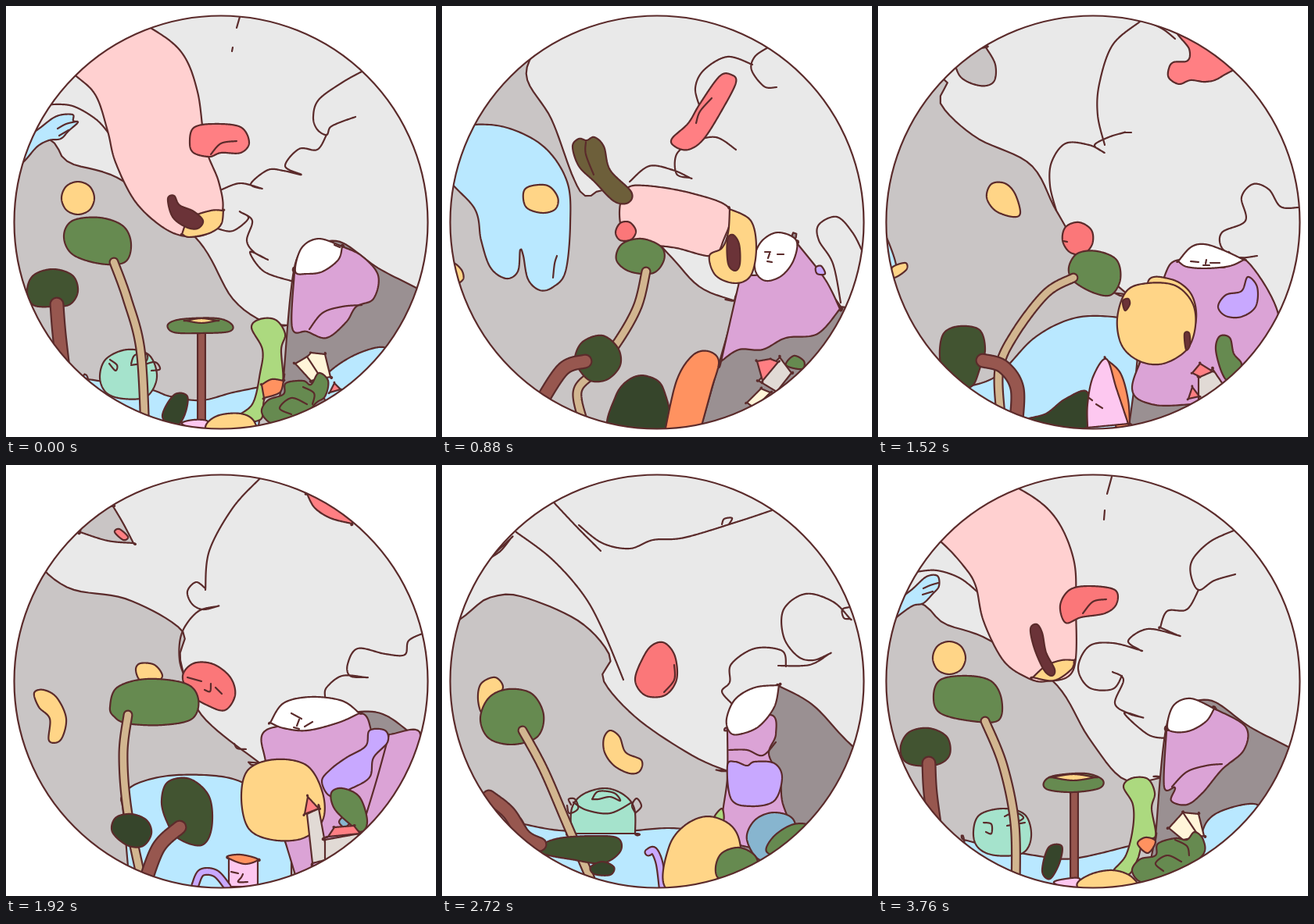
An HTML page with a canvas that plays this animation: 550 by 552 pixels, repeating every 3.84 s.

```html
<!DOCTYPE html>
<html lang="en">
<head>
<meta charset="utf-8">
<title>Morphing landscape</title>
<style>
html, body { margin: 0; width: 100%; height: 100%; overflow: hidden; background: #fff; }
canvas { display: block; }
</style>
</head>
<body>
<canvas width="550" height="552"></canvas>
<script>
const ctx = document.querySelector('canvas').getContext('2d');
const STEP = 80, STEPS = 48, SAMPLES = 240;
const KEYS = [0, 11, 19, 24, 34, 42, 47];
const INK = '#5b2b2b', PALE = '#e9e9e9', GREY = '#c9c5c5', DARK = '#9a9092', PINK = '#ffd0d0',
  RED = '#ff7f83', YELLOW = '#ffd587', GREEN = '#668a50', FOREST = '#425431', BLUE = '#b9e8ff',
  PURPLE = '#dba3d6', VIOLET = '#c8a8ff', TAN = '#d2b690', BROWN = '#97574f', LIME = '#acd97f',
  TEAL = '#a5e3cc', ORANGE = '#ff9260', ROSE = '#fdc8f0', CREAM = '#fff5d9', WALL = '#e1dad5';
const parts = [];

// Smooth curve through "x,y" points, evenly resampled; "!" marks a sharp corner.
function sample(text, open) {
  if (!text) return null;
  const pts = text.split(' ').flatMap(p => {
    const xy = p.split(',').map(parseFloat);
    return p.endsWith('!') ? [xy, xy] : [xy];
  });
  const n = pts.length, dense = [], lengths = [0];
  const at = i => pts[open ? Math.max(0, Math.min(n - 1, i)) : (i + n) % n];
  for (let i = 0; i < (open ? n - 1 : n); i++) {
    const [a, b, c, d] = [at(i - 1), at(i), at(i + 1), at(i + 2)];
    for (let j = 0; j <= 24; j++) {
      const t = j / 24;
      dense.push([0, 1].map(k => b[k] + t / 2 * (c[k] - a[k] +
        t * (2 * a[k] - 5 * b[k] + 4 * c[k] - d[k] + t * (3 * (b[k] - c[k]) + d[k] - a[k])))));
    }
  }
  for (let i = 1; i < dense.length; i++)
    lengths[i] = lengths[i - 1] + Math.hypot(dense[i][0] - dense[i - 1][0], dense[i][1] - dense[i - 1][1]);
  const total = lengths.at(-1), last = open ? SAMPLES - 1 : SAMPLES;
  let j = 0;
  return Array.from({ length: SAMPLES }, (_, i) => {
    const want = total * i / last;
    while (j < dense.length - 2 && lengths[j + 1] < want) j++;
    return mix(dense[j], dense[j + 1], (want - lengths[j]) / (lengths[j + 1] - lengths[j] || 1));
  });
}
const mix = (a, b, u) => [a[0] + (b[0] - a[0]) * u, a[1] + (b[1] - a[1]) * u];
const centre = pts => [0, 1].map(k => pts.reduce((sum, p) => sum + p[k], 0) / pts.length);

// Rotate the start of a closed outline to best match the previous pose.
function align(prev, next) {
  const p = centre(prev), q = centre(next);
  let best = Infinity, shift = 0;
  for (let s = 0; s < SAMPLES; s += 2) {
    let cost = 0;
    for (let i = 0; i < SAMPLES; i += 4) {
      const a = prev[i], b = next[(i + s) % SAMPLES];
      cost += (a[0] - p[0] - b[0] + q[0]) ** 2 + (a[1] - p[1] - b[1] + q[1]) ** 2;
    }
    if (cost < best) { best = cost; shift = s; }
  }
  return [...next.slice(shift), ...next.slice(0, shift)];
}
function add(style, texts) {
  const poses = texts.map(t => sample(t, style.open));
  if (!style.open) for (let i = 1; i < poses.length; i++)
    if (poses[i] && poses[i - 1]) poses[i] = align(poses[i - 1], poses[i]);
  parts.push({ ...style, poses });
}
const shape = (fill, ...poses) => add({ fill }, poses);
const line = (...poses) => add({ open: true }, poses);
const limb = (fill, width, ...poses) => add({ fill, width, open: true }, poses);

// Pale mass
shape(PALE,
  '0,140 58,172 80,200 148,223 243,297 290,375 335,407 362,409! 600,420! 600,-40! 0,-40!',
  '125,40 108,90 140,145 168,220 185,244 215,240 290,318 330,360 376,378! 600,420! 600,-40! 140,-40!',
  '0,100 85,93 80,125 125,168 195,203 228,262 265,320 320,370! 600,420! 600,-40! 0,-40!',
  '30,100 75,155 155,172 225,212 223,250 250,320 325,382! 600,420! 600,-40! 0,-40!',
  '0,190 60,170 100,168 175,200 215,245 206,275 250,325 320,372 365,392! 600,420! 600,-40! 0,-40!',
  '85,150 103,172 130,228 165,240 203,222 235,310 290,367 365,391! 600,420! 600,-40! 0,-40!',
  '0,140 60,180 85,203 140,223 225,278 270,350 315,403 365,400! 600,420! 600,-40! 0,-40!');
shape(GREY, '', '', '138,53! 150,75 148,97 130,102 105,90 95,60!',
  '137,53! 150,75 163,100! 130,97 95,86! 100,50!', '88,94! 75,110 60,120!');
shape(RED, '', '', '', '139,86 145,82 156,92 150,96');

// Contours on the pale mass
line('455,84 430,98 400,120 393,142 398,158 410,165 415,155 430,148 447,142',
  '417,53 400,65 396,82 412,103 428,104',
  '335,20 300,50 283,100 281,140 290,178',
  '325,17 290,55 260,110 255,160',
  '422,58 380,72 310,93 270,96 240,107 205,100 175,77',
  '290,12 293,30 290,60 295,85 315,89',
  '455,84 425,98 403,120 400,140 410,160 430,148 457,140');
line('410,165 398,184 375,183 357,205 378,216 355,211 335,210 313,228 328,234 300,227 276,235',
  '397,75 365,65 335,82 324,105 330,130',
  '324,162 315,162! 295,168 277,178 288,187! 270,178 240,176 222,200 220,230 228,262',
  '255,158 243,150 232,162 238,178 252,185 270,181! 245,188 225,215 222,250 232,280',
  '95,86 140,120 180,165 205,210 232,275',
  '364,332 335,305 310,272 285,265 278,245 300,232 330,242 352,258 360,243 380,243 388,256! 360,262 400,256 437,254',
  '410,160 395,185 370,187 361,208! 383,218! 345,210 320,225 335,237! 300,228 270,232 256,260 270,285 300,287 312,270');
line('270,285 290,288 310,272 300,264! 315,275 308,300 317,315 333,324! 312,315 330,340 368,353',
  '376,184 350,168 320,175 300,190 300,215 317,220! 295,210 265,205 240,225', '', '',
  '370,305 358,290 368,278 370,255 400,235 435,238 440,258', '',
  '300,265 314,275 303,305 320,318 337,323! 315,318 345,345 368,350');
line('', '538,315 525,290 505,270 482,280 482,300 500,330 510,380',
  '538,258 515,257 500,235 480,228 465,245 470,275 440,290 440,310 460,322 485,320',
  '535,215 515,225 510,243 485,242 450,235 437,255 440,270 460,272! 430,270 410,285 408,297',
  '522,182 512,185 514,196 522,197! 500,175 465,165 437,185 437,220 455,245 475,250 495,242! 470,256 430,257',
  '487,163 475,135 450,132 420,140 405,170 405,220 412,253');
line('299,14 295,28', '', '345,20 365,30 380,42', '', '143,48 175,82 203,110', '165,45 160,38', '299,15 293,37');
line('290,53 289,58', '', '', '', '358,76 361,69 371,68 367,76', '457,130 458,114 482,110', '290,58 289,70');
line('56,126 85,128 115,145 133,165', '', '', '', '', '150,140 180,165 200,210 210,255', '48,137 75,135 105,145 130,165');
line('', '', '', '292,357 296,363 307,364');

// Slope, water and hand
shape(DARK,
  '400,303! 430,303 475,335 525,361 600,400! 600,600! 330,600! 355,475! 370,330',
  '378,375! 328,550! 600,600! 600,400! 510,385! 450,300!',
  '400,320! 340,440 318,545! 600,600! 600,400! 512,395! 450,320!',
  '380,330! 380,600! 600,600! 600,390! 528,350 470,316',
  '400,300! 380,480 380,600! 600,600! 600,420! 525,360 475,308 431,283!',
  '390,310! 365,400 350,520! 600,600! 600,410! 525,362 470,322 430,300!',
  '400,303! 430,303 475,335 525,361 600,400! 600,600! 330,600! 355,475! 370,330');
shape(BLUE, '105,478! 180,490 210,500 250,505 290,495 330,487! 320,560! 120,560!', '',
  '100,490! 150,475 200,425 250,400 300,398 335,407! 330,470 320,545! 150,560!',
  '150,445 148,425 170,407 220,397 290,402 330,430 365,500! 365,560! 160,560!',
  '105,460! 150,468 220,470 290,465 340,470! 330,570! 160,570!',
  '115,488! 150,495 200,495 230,482 280,479 325,487! 300,560! 150,560!',
  '110,480! 150,490 200,500 250,504 325,487! 315,560! 120,560!');
shape(BLUE, '10,210 15,180 45,155 65,141 85,139 86,147 92,149 80,160 70,170 55,172 40,180 25,197',
  '10,165 30,153 80,155 130,180 160,225 164,280 158,340 142,360 125,364 110,350 104,320 100,312 97,340 82,349 62,335 50,300 42,260 5,215',
  '5,290 20,320 23,345 5,350', '', '', '',
  '10,205 20,180 45,158 62,143 76,142 78,155 70,165 58,177 45,180 30,190');
line('66,157 77,151 90,148', '', '', '', '', '', '58,158 67,154 77,151');
line('68,166 80,159', '142,348 144,330 147,320', '', '', '', '', '57,166 70,162');
shape(YELLOW, '71,246 77,231 92,225 107,231 113,246 107,261 92,267 77,261',
  '104,240 112,231 135,230 148,245 145,260 128,265 108,258',
  '139,245 145,228 162,227 175,240 182,265 172,270 150,262',
  '166,262 172,254 190,256 200,270 190,278 172,276',
  '46,300 50,280 68,272 78,285 65,300 52,318',
  '58,262 68,243 88,243 100,260 95,278 75,282 62,278',
  '70,247 76,232 91,226 106,232 112,247 106,262 91,268 76,262');

// Teal head and pot
shape(TEAL, '120,475 128,452 155,440 183,447 193,475 180,500 150,503 128,495', '', '', '',
  '165,472! 166,440 180,422 208,414 232,422 246,440 247,472!',
  '137,475 145,455 170,445 200,450 211,475 200,495 165,497 142,490',
  '122,470 130,448 160,440 188,448 196,475 185,497 150,500 128,490');
line('133,453 142,460 140,467 132,458', '', '', '', '168,432 185,442 215,446 243,432', '145,462 156,466 156,482 142,480', '135,458 145,460 145,472 138,470');
line('160,458 165,447 180,446 178,456 160,460', '', '', '', '192,428 200,418 220,420 228,430 215,425 200,428 192,428',
  '172,455 180,462 193,460 190,448', '162,450 175,445 186,452 172,460');
line('170,462 190,456 197,465 186,467', '', '', '', '165,435 162,428 170,428 174,440 163,446 160,436', '180,485 185,474 208,474', '165,462 188,458');
line('', '', '', '', '247,445 243,436 249,427 255,437 247,446');

// Mountain figure
shape(PURPLE, '369,340! 366,412 385,417 410,425 435,405 448,385 470,375 476,345 455,320 430,308! 400,335',
  '382,345! 357,455! 380,440 410,440 440,425 480,420 509,388! 490,350 455,305! 430,340',
  '325,490 345,430 365,350 385,325 440,335 470,325 512,395 500,460 470,500 400,510 350,510',
  '332,380 332,340 400,330 455,318 470,345 490,345 530,345 500,430 450,500 370,525! 345,440',
  '365,340! 420,320 427,345 418,370 432,400 435,430 445,475 400,490 360,470 365,400',
  '370,335! 362,400 357,452 390,462 420,450 435,400 440,360 470,325 465,318 430,310 400,340',
  '369,340! 366,412 380,413 375,430 395,435 415,420 440,390 468,365 470,335 430,312! 400,335');
line('388,414 405,393 430,385 455,383', '', '', '490,345 475,400 460,450', '367,365 390,365 410,372 427,355', '375,378 410,380 440,368', '376,412 395,393 420,385 440,383');
shape('#fff', '370,340 378,310 400,298 430,308! 425,325 405,340 385,343',
  '400,320 410,300 430,290 453,300 450,325 435,345 415,352 402,342',
  '384,327! 400,309 417,305 440,312 468,325! 450,333 420,336 395,334',
  '338,330! 355,305 390,297 430,302 452,318! 425,330 385,340 355,337',
  '364,325 375,300 400,285 431,282! 425,310 405,335 380,345 368,342',
  '369,335 378,308 400,299 436,303! 425,325 400,343 380,343',
  '370,335 378,308 400,299 430,312! 420,328 400,340 380,342');
line('420,306 427,309', '413,315 420,315', '400,327 410,328', '365,318 378,325');
line('', '429,318 437,318', '425,329 437,329', '382,335 392,329');
line('', '419,317 417,323', '420,325 419,330', '375,326 372,334');
line('', '416,327 422,328', '416,332 424,332', '368,336 375,338');
shape(VIOLET, '', '478,335 485,333 490,343 480,343',
  '435,385 445,370 465,365 473,347 485,360 483,385 465,398 445,397',
  '404,405 415,390 435,375 460,360 465,340 485,340 488,355 470,375 465,400 440,415 415,424',
  '365,385 375,380 390,385 400,380 425,382 435,400 425,430 395,437 370,428',
  '366,385 375,380 400,388 411,398 405,406 385,398 368,393');

// Long pink creature
shape(PINK, '90,90 115,115 130,160 140,200 165,250 200,283 230,295 260,290 277,262 272,225 255,180 245,110 225,60 185,28 130,0 50,60',
  '227,265 235,235 260,230 320,240 368,260 360,300 345,320 300,310 265,305 235,295', '', '',
  '-40,140 -38,142 -40,144',
  '17,222 40,200 90,172 125,165 150,145 148,115 130,92 97,80 30,60 -20,150',
  '80,98 110,130 125,155 135,200 160,250 190,272 215,277 250,262 253,180 250,120 225,65 180,30 110,0 30,60');
shape(YELLOW, '225,292! 235,272 262,262 278,262! 275,280 260,291 235,296',
  '368,260! 395,275 402,310 395,345 375,355 350,345 342,320 358,310 366,290',
  '345,355 375,350 400,368 407,400 395,430 365,430', '', '', '',
  '198,272! 215,257 235,250 251,250! 247,262 225,276');
shape('#6b3338', '207,247 215,243 222,255 240,263 252,275 245,285 230,283 213,270',
  '365,300 372,293 380,305 381,330 375,339 366,330', '', '', '',
  '58,135 75,123 90,123 92,132 75,145 62,145',
  '195,210 203,204 210,215 215,240 226,262 222,270 212,262 200,235');
shape('#6d5f3a', '', '167,180 175,170 185,172 195,168 207,180 215,210 242,238 238,252 220,250 195,225 175,205');
line('', '184,174 184,190 194,216');
shape(RED, '235,175 240,156 265,151 300,155 311,175 300,188 275,188 260,193 240,188',
  '294,170 315,150 330,125 355,90 370,88 376,98 360,130 335,170 315,184 298,180',
  '372,80 378,72 396,70 398,55 385,30 475,60 440,90 420,97 400,95 385,100 372,92',
  '385,37! 395,55 415,68 442,75! 460,50 410,20');
shape('#fb7779', '', '222,290 228,278 240,277 248,288 242,299 228,300',
  '236,300 240,283 257,277 273,287 274,305 262,318 245,315',
  '226,270 240,254 265,255 287,272 293,295 280,314 258,308 235,293',
  '247,275 258,245 270,230 285,228 298,245 300,275 285,295 260,295',
  '253,200 258,170 275,160 288,170 277,190 288,215 280,235 265,238 255,225',
  '233,180 245,160 270,155 303,160 305,178 290,190 260,195 240,202');
line('262,190 275,176 295,173', '325,150 330,135 345,118', '237,301 242,302', '232,272 250,277', '297,256 297,275 284,291', '279,182 273,195 281,205', '262,190 275,175 292,172');
line('', '', '', '262,280 261,290 254,288');
line('', '', '', '268,285 276,293');

// Trees
shape(GREEN, '74,295 85,275 120,271 150,282 160,305 152,328 120,330 85,318',
  '223,325 230,305 255,298 280,308 284,325 270,342 240,340',
  '244,335 255,317 280,314 305,325 310,350 298,370 275,367 250,352',
  '133,310 142,285 180,274 230,280 246,300 238,325 200,333 155,331 138,322',
  '49,325 60,298 85,287 115,293 130,320 122,348 90,358 60,350',
  '56,310 60,285 95,272 125,282 133,310 125,335 95,342 65,335',
  '71,297 80,275 115,270 145,277 158,300 154,327 120,328 80,318');
limb(TAN, 11, '138,328 155,375 172,440 178,545', '261,340 250,385 225,430 195,468 173,495 185,545',
  '250,348 215,368 175,420 155,465 157,525', '156,320 150,370 155,440 172,525',
  '103,340 130,390 160,460 190,530', '122,333 150,375 168,430 175,545', '137,328 160,385 175,460 176,545');
shape(FOREST, '27,365 35,345 60,337 85,345 92,365 82,382 60,385 35,383',
  '170,450 180,430 205,422 225,438 228,460 212,478 190,480 175,465',
  '79,440 85,418 105,410 130,415 137,440 130,465 122,485 110,488 95,475 82,465',
  '199,430 207,406 235,402 260,425 263,465 250,487 220,478 205,455',
  '125,488 150,478 195,475 225,478 228,495 205,510 165,505 130,498',
  '62,345 85,340 112,350 121,378 108,408 85,422 70,410 60,380',
  '29,360 40,342 65,337 88,348 92,370 78,383 50,385 33,378');
limb(BROWN, 17, '65,382 68,420 75,480', '183,455 155,465 125,510', '134,454 160,462 178,490 176,540',
  '222,464 195,490 176,540', '60,425 85,445 105,475 125,486', '65,364 63,400 72,480', '65,382 67,420 75,480');
shape('#36452b', '200,525 215,498 232,500 228,525 215,540', '215,545 222,500 240,478 262,474 283,490 288,545',
  '185,533 215,522 240,503 268,495 265,545', '136,470 140,452 160,447 180,455 186,472 175,488 155,487',
  '190,515 205,508 220,515 215,525 195,524', '197,498 205,485 225,485 240,500 230,515 210,512',
  '210,520 218,490 235,488 232,510 220,530');
limb(BROWN, 10, '250,418 250,535', '', '', '', '', '249,402 249,414', '251,418 251,535');
shape(GREEN, '207,408 225,401 270,400 289,408 285,417 250,419 215,418', '', '', '', '',
  '220,388 248,380 274,390 262,406 248,409 232,406', '212,407 225,398 265,395 287,403 283,414 250,419 218,416');
shape(YELLOW, '230,403! 250,400 270,403! 250,406');
shape(YELLOW, '', '14,330 25,338 27,350 16,355', '18,335 35,329 36,338 20,348',
  '36,292 48,288 65,298 77,325 70,352 55,353 56,325 42,310',
  '207,350 215,340 227,348 235,368 255,378 253,392 240,395 220,385 208,368',
  '220,385 228,365 248,360 270,370 274,390 260,399 235,399', '222,400! 250,396 278,400! 250,404');

// Foreground
shape(LIME, '314,412 325,401 345,402 357,420 352,440 354,480 340,480 330,505 325,530 290,530 315,510 325,470 328,440',
  '', '', '', '348,452 358,440 360,455', '327,440 335,428 352,435 354,460 350,490 330,490',
  '314,412 325,401 345,402 354,420 350,440 355,475 340,480 332,505 320,525 300,522 317,500 326,465 326,435');
shape(ORANGE, '327,485! 340,478 355,480! 350,495 330,502!', '285,545! 300,480 320,448 340,442 354,455 345,490 330,545!',
  '291,452! 310,470 320,505 322,540! 305,540 292,480', '', '', '', '332,485 342,477 355,482 345,497');
shape(ROSE, '225,535 240,530 258,532 250,545', '', '268,510 275,475 292,452 305,490 320,535! 268,540!',
  '285,504! 322,507! 322,540! 285,540!', '', '240,535 252,515 272,510 275,518 260,535', '225,535 240,530 258,530 250,545');
shape(ORANGE, '', '', '', '283,502 300,499 322,505 305,511');
line('', '', '270,502 274,505', '288,521 297,523');
line('', '', '279,510 287,515', '303,524 301,528 297,534 309,534');
limb(VIOLET, 9, '', '', '', '242,538 250,522 268,523 283,540', '264,496 271,494 278,510 282,540', '255,535 262,520 273,514');
shape(YELLOW, '255,540 270,525 300,522 318,533 320,560 270,560', '',
  '306,400 318,365 345,355 380,358 402,380 406,410 395,440 365,458 335,455 312,435',
  '301,425 310,390 345,377 385,385 405,420 405,455 380,478 340,480 310,465',
  '285,540 290,490 310,462 340,450 370,462 382,490 380,540 330,560',
  '255,545 290,510 320,495 345,492 360,520 340,560', '255,540 270,525 300,519 325,528 335,550 290,560');
shape('#6b3338', '', '', '313,378 320,375 322,382 316,390');
shape('#6b3338', '', '', '392,420 398,419 399,434 394,440');
shape('#87b5cf', '', '', '', '426,457 433,450 440,457 433,464', '390,480 400,455 425,445 450,455 450,490 410,507',
  '385,515 410,475 450,458 480,460 440,500 405,525');
shape(BLUE, '405,480 440,450 483,437 490,460 420,510', '', '', '', '',
  '440,450 455,435 480,437 490,445 470,465 445,462', '415,470 435,445 485,435 490,470 420,510');
shape(CREAM, '370,458! 385,449 390,444! 408,446! 415,475! 390,480!', '390,508! 408,490! 420,495! 400,515!', '', '', '',
  '378,460! 408,464! 405,480! 380,480!', '372,465! 390,445! 410,447! 417,475! 390,480!');
line('385,449 402,475', '', '', '', '', '397,463 397,480', '390,445 410,475');
shape(GREEN, '327,520 335,505 355,497 358,483 380,480 390,485 400,470 412,480 408,500 395,510 370,540 340,535',
  '440,460 450,448 463,455 460,465', '432,440 437,423 450,425 455,445 465,460 450,480 440,470',
  '416,420 430,414 452,425 462,455 455,470 440,460 420,440',
  '350,515 358,497 380,490 400,500 402,515 380,530 355,530',
  '335,520 340,500 360,492 375,480 400,485 400,510 375,535 345,530',
  '325,520 335,505 355,500 358,485 380,478 395,480 405,470 416,480 415,500 380,525 340,535');
line('365,523 350,515 365,502 385,510', '', '', '', '', '', '365,520 355,510 370,500 388,508');
line('392,510 394,496 380,488', '', '', '', '', '', '398,500 395,488 380,480');
shape(GREEN, '', '', '', '', '415,495 425,475 450,460 470,465 440,500', '415,495 430,480 445,475 440,492');
shape(WALL, '', '418,465! 432,450! 447,470! 428,494! 405,480!', '410,475! 428,465! 445,490! 425,507! 410,505!',
  '385,447! 400,440! 412,505! 392,510!');
shape(RED, '414,495! 420,483! 428,491!', '403,455! 420,452! 430,456! 410,480!', '402,470! 412,458! 428,468! 412,475!', '382,447! 386,425! 400,440!');
shape(WALL, '', '', '', '408,480! 452,472! 440,500! 408,515!');
shape(RED, '', '', '397,503! 402,488! 411,500!', '412,476! 420,464! 445,462! 453,472!');

function trace(points, closed) {
  ctx.beginPath();
  points.forEach(p => ctx.lineTo(...p));
  if (closed) ctx.closePath();
}
function stroke(color, width) {
  ctx.strokeStyle = color;
  ctx.lineWidth = width;
  ctx.stroke();
}
function drawPart({ poses, fill, width, open }, key, u) {
  const from = poses[key], to = poses[key + 1];
  if (!from && (!to || !u)) return;
  let points = from;
  if (u) {
    // Parts without a pose grow from, or shrink to, their centre.
    const mid = from && to ? null : centre(from || to);
    points = (from || to).map((_, i) => mix(from ? from[i] : mid, to ? to[i] : mid, u));
  }
  trace(points, !open);
  if (width) {
    stroke(INK, width + 2);
    stroke(fill, width - 2.4);
  } else {
    if (fill) { ctx.fillStyle = fill; ctx.fill(); }
    stroke(INK, 2.2);
  }
}
function draw(step) {
  const key = KEYS.findLastIndex(k => k <= step);
  const u = key < KEYS.length - 1 ? (step - KEYS[key]) / (KEYS[key + 1] - KEYS[key]) : 0;
  ctx.fillStyle = '#fff';
  ctx.fillRect(0, 0, 550, 552);
  ctx.lineCap = ctx.lineJoin = 'round';
  const disc = new Path2D();
  disc.arc(275, 277, 264.5, 0, 2 * Math.PI);
  ctx.save();
  ctx.clip(disc);
  ctx.fillStyle = GREY;
  ctx.fillRect(0, 0, 550, 552);
  parts.forEach(part => drawPart(part, key, u));
  ctx.restore();
  ctx.strokeStyle = INK;
  ctx.lineWidth = 2.2;
  ctx.stroke(disc);
}
const start = performance.now();
let shown = -1;
function tick() {
  const step = Math.floor((performance.now() - start) / STEP) % STEPS;
  if (step !== shown) draw(shown = step);
  requestAnimationFrame(tick);
}
tick();
</script>
</body>
</html>
```
